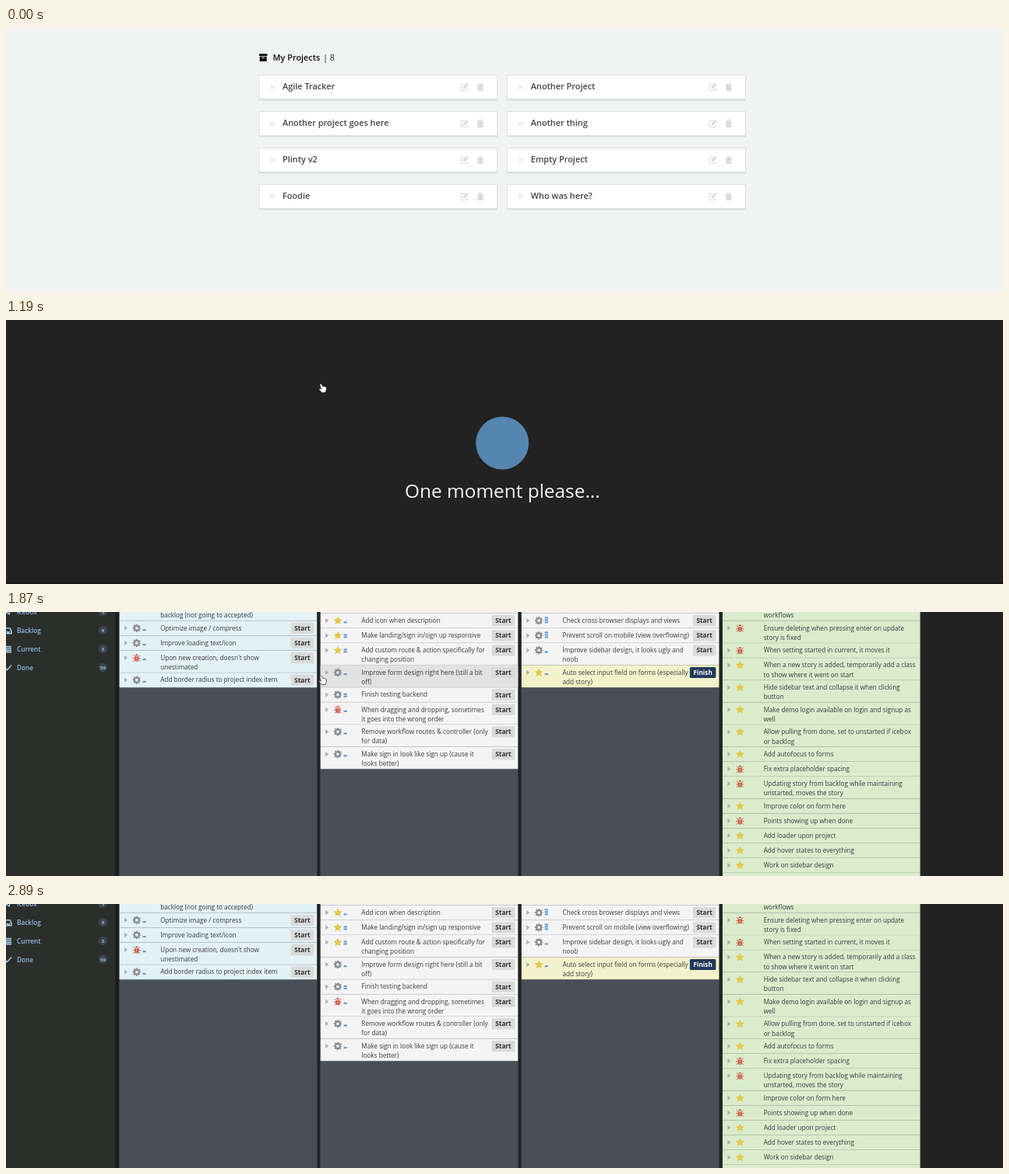
Animation of 1280x340 px, one loop 3230 ms. Source, as an HTML page:

```html
<!DOCTYPE html>
<html lang="en">
<head>
<meta charset="utf-8">
<title>Project board</title>
<style>
  html, body { margin: 0; width: 100%; height: 100%; overflow: hidden; background: #222; }
  svg { display: block; width: 1280px; height: 340px; font-family: "Open Sans", "Noto Sans", sans-serif; }
  .semi { font-weight: 600; }
  .bold { font-weight: 700; }
  .project { font-size: 10.9px; }
  .board { font-size: 8.2px; }

  /* One loop is 19 ticks of 170 ms; every change is a hard cut. */
  .cut { animation: 3230ms step-end infinite; }
  #projects { animation-name: projects; }
  #loader { animation-name: loader; }
  #board { animation-name: board; }
  #arrow { animation-name: arrow; }
  #pointer { animation-name: pointer; }
  #grab { animation-name: grab; }
  #link { animation-name: link; }
  #underline { animation-name: underline; }
  .hover-first { animation-name: hover-first; }
  .hover-last { animation-name: grab; }

  @keyframes projects { 0% { visibility: visible } 36.842%, 100% { visibility: hidden } }
  @keyframes loader { 0% { visibility: hidden } 36.842% { visibility: visible } 57.894%, 100% { visibility: hidden } }
  @keyframes board { 0% { visibility: hidden } 57.894%, 100% { visibility: visible } }
  @keyframes arrow {
    0% { visibility: hidden; transform: translate(471px, 202px) }
    5.263% { visibility: visible; transform: translate(471px, 202px) }
    10.526% { visibility: visible; transform: translate(451px, 174px) }
    15.789% { visibility: visible; transform: translate(406px, 85px) }
    21.052%, 100% { visibility: hidden; transform: translate(406px, 85px) }
  }
  @keyframes pointer { 0% { visibility: hidden } 21.052% { visibility: visible } 78.947%, 100% { visibility: hidden } }
  @keyframes grab { 0% { visibility: hidden } 78.947% { visibility: visible } 84.21%, 100% { visibility: hidden } }
  @keyframes link { 0% { fill: #444 } 21.052%, 100% { fill: #3f7fb5 } }
  @keyframes underline { 0% { visibility: hidden } 21.052% { visibility: visible } 36.842%, 100% { visibility: hidden } }
  @keyframes hover-first { 0% { visibility: hidden } 57.894% { visibility: visible } 78.947%, 100% { visibility: hidden } }
</style>
</head>
<body>
<svg viewBox="0 0 1280 340" xmlns="http://www.w3.org/2000/svg">
  <defs>
    <g id="gear">
      <circle r="3" fill="none" stroke="#8b8e90" stroke-width="2.4"/>
      <circle r="4.5" fill="none" stroke="#8b8e90" stroke-width="1.6" stroke-dasharray="1.8 1.734" stroke-dashoffset=".9"/>
    </g>
    <path id="star" fill="#e5c84c" d="M0-5.6 1.7-2 5.6-1.6 2.7 1.1 3.5 5 0 3-3.5 5-2.7 1.1-5.6-1.6-1.7-2Z"/>
    <g id="bug" stroke="#cd5c48" fill="#cd5c48">
      <path d="M-5 .6H5M-4.4-3.5-2-1.4M4.4-3.5 2-1.4M-4.4 4.8-2 2.4M4.4 4.8 2 2.4" fill="none"/>
      <path d="M-2.6-1.6H2.6V1.5Q2.6 4.8 0 4.8T-2.6 1.5ZM-2-2.7Q-1.8-4.8 0-4.8T2-2.7Z" stroke="none"/>
      <path d="M0-1V4.6" stroke="#f0d4ca" stroke-width=".6"/>
    </g>
    <g id="edit" fill="none" stroke="#d3d5d5">
      <path d="M3.2 1V3.2Q3.2 4.4 2 4.4H-3.6Q-4.8 4.4-4.8 3.2V-2.4Q-4.8-3.6-3.6-3.6H1"/>
      <path d="M-1 .9 3.9-4" stroke-width="2.2"/>
      <path d="M-1.9 2.1V-.4L.5 2.1Z" fill="#d3d5d5" stroke="none"/>
    </g>
    <g id="trash" fill="#d3d5d5">
      <path d="M-4.2-3.6H4.2V-2.5H-4.2ZM-3.4-2H3.4V4Q3.4 5 2.4 5H-2.4Q-3.4 5-3.4 4Z"/>
      <path d="M-1.5-3.6V-4.6H1.5V-3.6" fill="none" stroke="#d3d5d5" stroke-width=".9"/>
      <path d="M-1.6-.6V3.6M0-.6V3.6M1.6-.6V3.6" stroke="#f4f5f5" stroke-width=".6"/>
    </g>
    <path id="chevrons" d="M-2.6-2.6 0 0-2.6 2.6M.4-2.6 3 0 .4 2.6" fill="none" stroke="#cdd0d0"/>
  </defs>

  <g id="projects" class="cut">
    <rect width="1280" height="340" fill="#f1f3f2"/>
    <path d="M325 33.3H335.4V36H325ZM325.7 36.7H334.7V43H325.7Z" fill="#111"/>
    <path d="M328.7 38.2H331.7" stroke="#f1f3f2"/>
    <text class="project semi" x="342.5" y="42" fill="#111">My Projects</text>
    <text class="project" x="407" y="42" fill="#222">| 8</text>
    <g id="cards"></g>
    <path id="underline" class="cut" d="M352.5 80.9H423" stroke="#3f7fb5"/>
  </g>

  <g id="loader" class="cut">
    <rect width="1280" height="340" fill="#222"/>
    <rect y="337.5" width="1280" height="2.5" fill="#1d1719"/>
    <circle cx="637.2" cy="158.5" r="34" fill="#5685b0"/>
    <text x="512" y="229" font-size="24.4" fill="#f4f4f4">One moment please...</text>
  </g>

  <g id="board" class="cut board">
    <rect width="1280" height="340" fill="#222"/>
    <rect width="141" height="340" fill="#2c2e2c"/>
    <rect x="140.5" width="5" height="340" fill="#1b1c1c"/>
    <g id="menu"></g>
    <g id="columns"></g>
  </g>

  <g stroke-linejoin="round" stroke="#333" stroke-width=".8" fill="#fff">
    <path id="arrow" class="cut" d="M.5.5V13L3.4 10.3 5.4 15 7.5 14.1 5.5 9.6H9.6Z" fill="#111" stroke="#fff"/>
    <path id="pointer" class="cut" d="M403.4 82.5Q404.7 81.6 405.4 83L406.6 85.6Q407.8 84.7 408.5 85.8 409.5 85.2 410 86.3 411.2 86.1 411.3 87.4L411.2 90.2 410 93.5H405.3L402.1 89.6Q401.9 88.1 403.4 88.4L404.5 89.2 403 84Q402.7 83 403.4 82.5Z"/>
    <path id="grab" class="cut" d="M538.8 200.4 536.4 196.5Q536 194.8 537.3 195L538.5 196.4 537.6 192.4Q538.1 191 539.2 192L539.8 194 539.8 190.8Q540.8 189.5 541.7 190.8L542 193.8 542.6 191.1Q543.7 190 544.3 191.4L544.1 194.4 544.9 192.8Q546.2 192.2 546.3 193.6L545.6 197.4 544.2 200.4Z"/>
  </g>
</svg>

<script>
const fill = (id, markup) => { document.getElementById(id).innerHTML = markup; };
const use = (id, x, y) => `<use href="#${id}" x="${x}" y="${y}"/>`;
const text = (x, y, label, attrs = '') => `<text x="${x}" y="${y}" ${attrs}>${label}</text>`;
const rect = (x, y, w, h, attrs) => `<rect x="${x}" y="${y}" width="${w}" height="${h}" ${attrs}/>`;

const projects = ['Agile Tracker', 'Another Project', 'Another project goes here', 'Another thing',
  'Plinty v2', 'Empty Project', 'Foodie', 'Who was here?'];

fill('cards', projects.map((name, i) => {
  const x = 324.5 + 318.8 * (i % 2), y = 60 + 47 * (i >> 1);
  const attrs = i ? 'class="project semi" fill="#444"' : 'id="link" class="project semi cut" fill="#444"';
  return rect(x, y, 306.5, 33.5, 'fill="#dcdfdf"') +
    rect(x + 1, y + 1, 304.5, 30, 'fill="#fff"') +
    use('chevrons', x + 17.2, y + 16) +
    text(x + 30.5, y + 19.4, name, attrs) +
    use('edit', x + 264.5, y + 16) + use('trash', x + 284.5, y + 16);
}).join(''));

const menu = [['Icebox', 3], ['Backlog', 9], ['Current', 5], ['Done', 59]];
const menuIcons = [
  'M-2 2 6-5 4 3 1 1Z',
  'M-2 1 0-3H5L7 1V4H-2ZM1 1 2 2.4H4L5 1',
  'M-2-3H7M-2-.6H7M-2 1.8H7M-2 4H7',
  'M-2 0 1.5 3.2 7-3'
];
fill('menu', menu.map(([label, count], i) => {
  const y = -.2 + 23.9 * i;
  return `<path d="${menuIcons[i]}" transform="translate(0 ${y})" fill="none" stroke="#9cc7ea" stroke-width="1.6"/>` +
    text(14, y + 3.2, label, 'class="semi" fill="#8fbde2"') +
    `<circle cx="124.5" cy="${y - .2}" r="5.6" fill="#3b4652"/>` +
    text(124.5, y + 2, count, 'class="semi" font-size="6" text-anchor="middle" fill="#b9d6ee"');
}).join(''));

// Each story: icon, points, first line, second line, state.
const columns = [
  { color: '#e2f2f6', button: 'Start', stories: [
    ['star', 1, '', 'backlog (not going to accepted)'],
    ['gear', 1, 'Optimize image / compress'],
    ['gear', 1, 'Improve loading text/icon'],
    ['bug', 1, "Upon new creation, doesn't show", 'unestimated'],
    ['gear', 1, 'Add border radius to project index item']] },
  { color: '#f4f4f4', button: 'Start', stories: [
    ['star', 1, ''],
    ['star', 1, 'Add icon when description'],
    ['star', 2, 'Make landing/sign in/sign up responsive'],
    ['star', 2, 'Add custom route &amp; action specifically for', 'changing position'],
    ['gear', 1, 'Improve form design right here (still a bit', 'off)', 'hover-first'],
    ['gear', 2, 'Finish testing backend'],
    ['bug', 1, 'When dragging and dropping, sometimes', 'it goes into the wrong order'],
    ['gear', 1, 'Remove workflow routes &amp; controller (only', 'for data)'],
    ['gear', 1, 'Make sign in look like sign up (cause it', 'looks better)', 'hover-last']] },
  { color: '#f4f4f4', button: 'Start', stories: [
    ['gear', 1, ''],
    ['gear', 3, 'Check cross browser displays and views'],
    ['gear', 3, 'Prevent scroll on mobile (view overflowing)'],
    ['gear', 1, 'Improve sidebar design, it looks ugly and', 'noob'],
    ['star', 1, 'Auto select input field on forms (especially', 'add story)', 'started']] },
  { color: '#d9edcd', stories: [
    ['star', 0, '', 'workflows'],
    ['bug', 0, 'Ensure deleting when pressing enter on update', 'story is fixed'],
    ['bug', 0, 'When setting started in current, it moves it'],
    ['star', 0, 'When a new story is added, temporarily add a class', 'to show where it went on start'],
    ['star', 0, 'Hide sidebar text and collapse it when clicking', 'button'],
    ['star', 0, 'Make demo login available on login and signup as', 'well'],
    ['star', 0, 'Allow pulling from done, set to unstarted if icebox', 'or backlog'],
    ['star', 0, 'Add autofocus to forms'],
    ['bug', 0, 'Fix extra placeholder spacing'],
    ['bug', 0, 'Updating story from backlog while maintaining', 'unstarted, moves the story'],
    ['star', 0, 'Improve color on form here'],
    ['bug', 0, 'Points showing up when done'],
    ['star', 0, 'Add loader upon project'],
    ['star', 0, 'Add hover states to everything'],
    ['star', 0, 'Work on sidebar design'],
    ['star', 0, '']] }
];
const columnWidth = 253.5;

function button(x, y, label) {
  const finish = label === 'Finish';
  const left = x + (finish ? 216 : 220), width = finish ? 33.5 : 29.5;
  return rect(left, y - 7, width, 14.2, `rx="1.5" fill="${finish ? '#213a59' : '#dadada'}"`) +
    text(left + width / 2, y + 3, label, `class="bold" text-anchor="middle" fill="${finish ? '#fff' : '#333'}"`);
}

function story(x, top, height, column, [icon, points, first, second = '', state]) {
  const y = top + 9.4;
  const hover = state && state.startsWith('hover');
  let out = rect(x, top, columnWidth, height, `fill="${state === 'started' ? '#f4f2cb' : column.color}"`);
  if (hover) out += rect(x, top, columnWidth, height, `class="cut ${state}" fill="#e2e2e2"`);
  out += rect(x, top + height - .8, columnWidth, .8, 'fill="#000" fill-opacity=".08"');
  out += `<path d="M${x + 6.4} ${y - 3.2}V${y + 3.2}L${x + 10.4} ${y}Z" fill="#aab0b0"/>`;
  out += use(icon, x + 22.2, y);
  for (let i = 0; i < points; i++) out += rect(x + 29.8, y + 1.2 - 3 * i, 4.2, 2, 'fill="#5b97d2"');
  out += text(x + 52.6, y + 2.9, first) + text(x + 52.6, y + 15.1, second);
  if (column.button) out += button(x, y, state === 'started' ? 'Finish' : column.button);
  return out;
}

fill('columns', columns.map((column, i) => {
  const x = 145.6 + 258.15 * i;
  let top = i % 3 ? -17.35 : -17.25;
  let out = rect(x - 1, 0, columnWidth + 2, 340, 'fill="#2f3336"') +
    rect(x, 0, columnWidth, 340, 'fill="#484f56"');
  // Stories overlap by a hair so that no seam shows between them.
  for (const item of column.stories) {
    const height = item[3] ? 28.65 : 19.07;
    out += story(x, top, height, column, item);
    top += height;
  }
  return `<g fill="#383b3d">${out}</g>`;
}).join('').replace(/ +\/>/g, '/>'));
</script>
</body>
</html>
```
